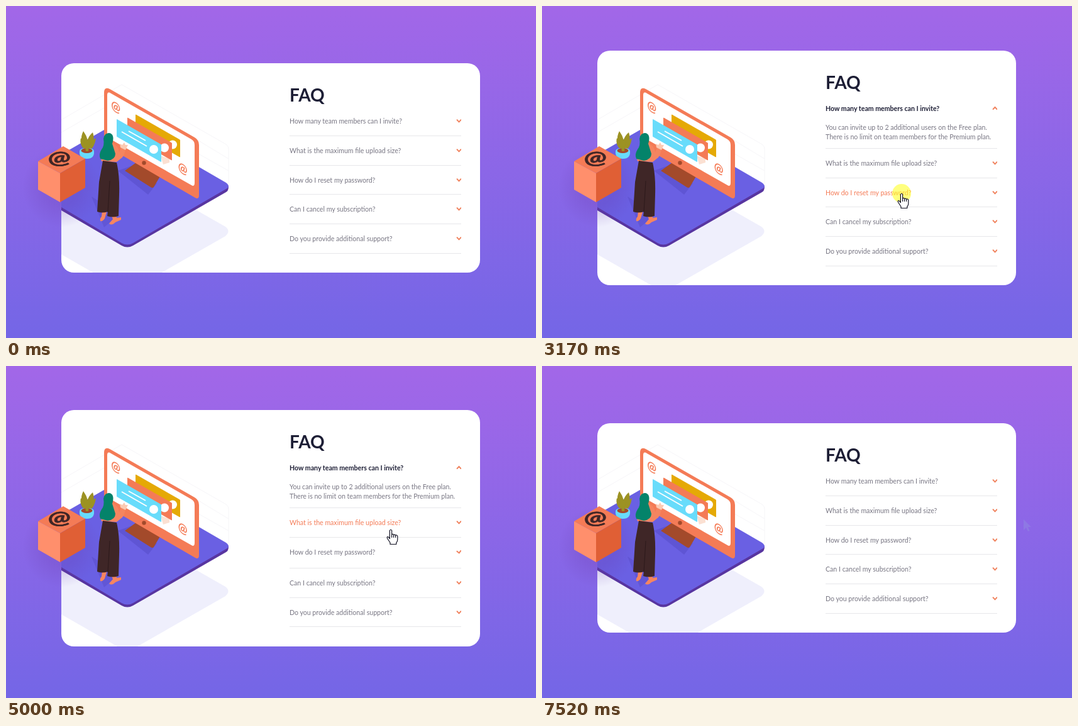
Recreate the animation shown at these times as an HTML page. Size 843 by 528 pixels, loop 8130 ms.

```html
<!DOCTYPE html>
<html lang="en">
<head>
<meta charset="utf-8">
<title>FAQ accordion</title>
<style>
html, body { margin: 0; width: 100%; height: 100%; overflow: hidden; }
body { position: relative; background: linear-gradient(#a267e8, #7466e6); font: 10.6px Lato, sans-serif; color: #787683; }
svg { position: absolute; left: 0; top: 0; width: 843px; height: 528px; overflow: visible; }
#card { position: absolute; left: 88px; width: 666px; overflow: hidden; border-radius: 20px; background: #fff; }
#scene { left: -88px; }
#list { position: absolute; left: 363px; top: 69px; width: 273px; }
h1 { position: absolute; left: 363px; top: 33px; margin: 0; font-size: 28px; line-height: 34px; color: #1d1e35; }
.item { position: relative; box-sizing: border-box; overflow: hidden; border-bottom: 1px solid #e7e7ea; }
.item p { position: absolute; margin: 0; left: 0; white-space: pre; }
.question { top: 15px; line-height: 16px; }
.answer { top: 45.5px; line-height: 15px; visibility: hidden; }
.item svg { left: 264.5px; top: 19px; width: 9px; height: 8px; fill: none; stroke: #f0805b; stroke-width: 1.9; }
.hover .question { color: #f47b56; }
.open .question { color: #1d1e35; font-weight: 700; }
.open .answer { visibility: visible; }
text { font-family: Lato, sans-serif; text-anchor: middle; }
</style>
</head>
<body>
<div id="card">
  <svg id="scene">
    <path fill="none" stroke="#f6f5f8" d="M88 181L184 125L350 220Q354 223 354 227V283M88 201L156 162M306 214L354 243M306 235L354 262"/>
    <path fill="#efeffc" d="M88 320L193 378L300 323L349 351Q358 358 349 366L202 450Q193 455 184 450L88 395Z"/>
    <path fill="#5835a0" d="M88 236V325L184 381Q193 386 202 381L350 296Q354 294 354 287L193 190Z"/>
    <path fill="#6a60e3" d="M88 236L156 197L193 190L350 281Q358 287 350 291L202 377Q193 382 184 377L88 320Z"/>
    <path fill="#5347c0" opacity=".45" d="M178 262L200 254L240 282L226 300Z"/>
    <path fill="#5347c0" opacity=".4" d="M136 303L150 312L172 338L156 352Z"/>

    <path fill="#a34a2b" d="M189 262L207 249L245 271L235 288Q233 290 230 288Z"/>
    <path fill="#f47b56" d="M156 138Q156 128 165 132L300 209Q307 213 307 221V301Q307 308 301 305L158 222Q156 221 156 218Z"/>
    <path fill="#fff" d="M161 142Q161 135 167 139L295 212Q300 215 300 221V281Q300 288 295 285L163 210Q161 209 161 206Z"/>
    <circle cx="219.500" cy="249.500" r="3.200" fill="#a34a2b"/>
    <g fill="#f47b56" font-size="20" font-weight="700">
      <text transform="matrix(.87 .5 0 1 174.500 167)">@</text>
      <text transform="matrix(.87 .5 0 1 281 265)">@</text>
    </g>
    <path fill="#fbe0d2" d="M246 238L260 243V249L250 252Z"/>
    <g id="slides"></g>
    <path fill="none" stroke="#fff" stroke-width="1.800" d="M184 200L224 223M195 199L222 214"/>

    <g fill="#9c9223">
      <path d="M128 231Q115 214 123 199Q133 212 131 231Z"/>
      <path d="M128 231Q116 222 119 210Q128 218 130 231Z"/>
      <path d="M128 231Q126 211 138 201Q143 216 132 231Z"/>
      <path d="M129 231Q132 216 143 210Q141 226 131 231Z"/>
    </g>
    <path fill="#68dcfb" d="M117 231Q117 226 128.500 226T140 231Q141 243 128.500 243T117 231Z"/>
    <ellipse cx="128.500" cy="230" rx="9" ry="4" fill="#a34a2b"/>
    <path fill="#9c9223" d="M127 231L124 214L133 213L131 231Z"/>

    <g fill="#f58560">
      <path d="M153 326L152 335Q149 338 150 342Q154 343 157 338L160 328Z"/>
      <path d="M167 332L170 339L164 346Q168 350 174 344L183 340V336L176 337L175 332Z"/>
      <path d="M169 218Q179 222 180 233L184 223L190 224Q190 239 181 244L176 248L152 247L150 238Z"/>
    </g>
    <path fill="#fbcab3" d="M182 225L181 219L185 221L188 217L190 221L194 221L190 229Z"/>
    <path fill="#3f2627" d="M154 246L176 249Q181 270 180 300L179 334Q170 337 161 334L162 327Q153 330 145 327L148 280Z"/>
    <path fill="none" stroke="#2c191b" d="M165 278L162 328"/>
    <path fill="#04836a" d="M163 202C171 202 172 210 169 219L174 235Q174 244 162 246L150 243Q147 236 152 228Q157 222 155 211Q156 203 163 202Z"/>
  </svg>
  <h1>FAQ</h1>
  <div id="list"></div>
</div>

<svg>
  <defs>
    <radialGradient id="shade"><stop offset=".45" stop-color="#6b3fb0" stop-opacity=".25"/><stop offset="1" stop-color="#6b3fb0" stop-opacity="0"/></radialGradient>
  </defs>
  <ellipse cx="88" cy="288" rx="62" ry="64" fill="url(#shade)"/>
  <path fill="#f47b56" d="M51 247L91 223L126 243L86 266Z"/>
  <path fill="#ff8f6c" d="M51 247L86 266V312L51 292Z"/>
  <path fill="#e05f35" d="M86 266L126 243V289L86 312Z"/>
  <text transform="matrix(1.200 -.12 .1 .78 86 251.500)" font-size="36" font-weight="700" fill="#3f2627" stroke="#3f2627" stroke-width=".8">@</text>
  <path id="ghost" fill="#8f84e2" opacity=".6" transform="translate(766 244)"/>
  <g id="pointer">
    <circle id="glow" r="15" fill="#ffff20" fill-opacity=".58"/>
    <path id="cursor" fill="#fff" stroke="#111122" stroke-width="1.200" stroke-linejoin="round"/>
  </g>
</svg>

<script>
const LOOP = 8130, ROW = 46.75, FLIP = 300;
const $ = id => document.getElementById(id);
const clamp = x => Math.min(1, Math.max(0, x));
const ease = x => 1 - (1 - clamp(x)) ** 2.3;
const smooth = x => x * x * (3 - 2 * x);

// grow: height of the opened answer; on/off: opening and closing times
const items = [
  { q: 'How many team members can I invite?', grow: 40, on: 2065, off: 6250,
    a: 'You can invite up to 2 additional users on the Free plan.\nThere is no limit on team members for the Premium plan.' },
  { q: 'What is the maximum file upload size?' },
  { q: 'How do I reset my password?', grow: 55, on: 3362, off: 4780,
    a: 'Click “Forgot password” from the login page or “Change\npassword” from your profile page. A reset link will be\nemailed to you.' },
  { q: 'Can I cancel my subscription?' },
  { q: 'Do you provide additional support?' }
];

const shapes = {
  arrow: 'M0 0V17L4 13L7 19L9.5 18L7 12H12Z',
  hand: 'M-1.6 1.5Q0 -1 1.6 1.5V8Q3.200 6.500 4.600 8.500Q6.200 7.300 7.600 9.300Q9.500 8.300 10.800 10.500V16Q10.800 19 8.800 21V23.500H-1V21L-5.600 14Q-6.500 10.800 -4 11.800L-1.600 14.500ZM4.600 8.500V13M7.600 9.300V13M1.600 8V13',
  beam: 'M-1 -7H2M5 -7H2V8M-1 8H5'
};
const clicks = [[1940, 2130], [3170, 3430], [4650, 4870], [6100, 6300]];
const path = [
  [1110, 819, 275], [1670, 627, 189], [2400, 627, 189], [2900, 572, 298],
  [4000, 572, 298], [4320, 612, 260], [5200, 612, 260], [5650, 592, 173],
  [6450, 592, 173], [6740, 766, 244]
];
const exit = [[7310, 821, 494], [7520, 838, 520]];

for (const it of items) {
  it.el = document.createElement('div');
  it.el.innerHTML = `<p class="question">${it.q}</p><p class="answer">${it.a || ''}</p><svg><path d="M1 1.700L4.500 5.400L8 1.700"/></svg>`;
  it.arrow = it.el.querySelector('path');
  $('list').append(it.el);
}
$('slides').innerHTML = [[206, 172, '#e5a905'], [193, 177, '#f47b56'], [176, 179.5, '#68dcfb']].map(([x, y, color]) =>
  `<path fill="${color}" stroke="${color}" stroke-linejoin="round" d="M${x + .5} ${y + 1}l70 40v27l-70 -40z"/><circle cx="${x + 59}" cy="${y + 48.5}" r="7" fill="#fff"/>`).join('');
$('ghost').setAttribute('d', shapes.arrow);

function along(keys, t) {
  const i = keys.findIndex(k => k[0] > t);
  if (i < 1) return null;
  const [t0, x0, y0] = keys[i - 1], [t1, x1, y1] = keys[i];
  const p = smooth((t - t0) / (t1 - t0));
  return [x0 + (x1 - x0) * p, y0 + (y1 - y0) * p];
}

function draw(now) {
  let t = now % LOOP;
  // the picture holds still while a click glows
  const click = clicks.find(([a, b]) => t >= a && t < b);
  if (click) t = click[0];

  let extra = 0;
  for (const it of items) {
    const turned = at => ease((t - at) / FLIP);
    it.amount = it.a ? turned(it.on) - turned(it.off) : 0;
    it.open = it.a && t >= it.on && t < it.off;
    extra += it.amount * (it.grow || 0);
  }
  const top = Math.round(257.5 - (333 + extra) / 2);
  $('card').style.top = top + 'px';
  $('card').style.height = Math.round(333 + extra) + 'px';
  $('scene').style.top = -top + 'px';

  const pos = along(path, t) || along(exit, t);
  const [px, py] = pos || [-99, -99];
  const inList = px > 451 && px < 724;
  let y = top + 69, kind = 'arrow';
  for (const it of items) {
    const height = ROW + it.amount * (it.grow || 0);
    const hover = inList && Math.abs(py - y - 23) < 16;
    if (hover) kind = 'hand';
    else if (inList && it.open && py > y + 45 && py < y + height - 8) kind = 'beam';
    it.el.className = 'item' + (it.open ? ' open' : hover ? ' hover' : '');
    it.el.style.height = height + 'px';
    it.arrow.setAttribute('transform', `rotate(${-180 * it.amount} 4.5 3.7)`);
    y += height;
  }

  $('pointer').style.display = pos ? '' : 'none';
  $('pointer').setAttribute('transform', `translate(${px} ${py})`);
  $('cursor').setAttribute('d', shapes[kind]);
  $('glow').style.display = click ? '' : 'none';
  $('ghost').style.display = t >= 6780 ? '' : 'none';
}

function tick() {
  draw(performance.now());
  requestAnimationFrame(tick);
}
tick();
</script>
</body>
</html>
```
